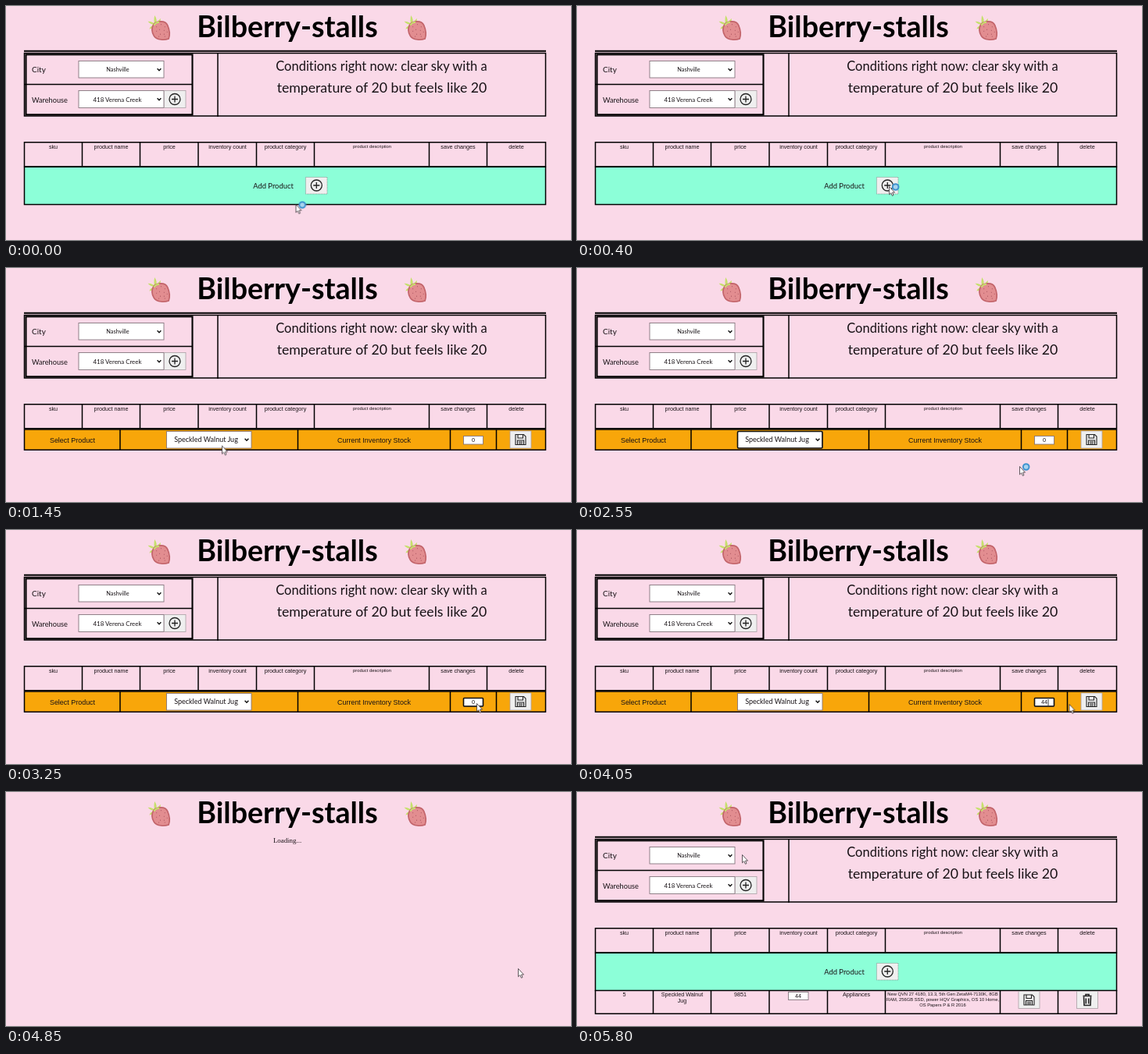
An HTML page for the animation above (5850 ms loop, 723 by 300 pixels).

```html
<!DOCTYPE html>
<html lang="en">
<head>
<meta charset="utf-8">
<title>Shop inventory</title>
<style>
  html, body { margin: 0; width: 100%; height: 100%; overflow: hidden; background: #fad9e8; }
  svg { display: block; width: 100%; height: 100%; }
  text { text-anchor: middle; font: 7.2px "Liberation Sans", Arial, sans-serif; fill: #181216; }
  .hand text, text.hand { font-family: Lato, "Open Sans", sans-serif; font-variant-ligatures: none; }
  .left { text-anchor: start; }
  text.title { font-size: 37.6px; font-weight: 700; fill: #000; }
  .tiny { font-size: 5.8px; }
  .label { font-size: 8.95px; }
  .grid { fill: none; stroke: #000; stroke-width: 1.5; }
  .thick { stroke-width: 2.1; }
  .field { fill: #fff; stroke: #85767e; stroke-width: .9; }
  .btn { fill: #efefef; stroke: #aaa0a5; stroke-width: .8; }
  .dotted { stroke: #777; stroke-dasharray: 1 1; }
  .icon { fill: none; stroke: #222; stroke-width: 1.3; }
  .ring { fill: none; stroke: #101010; stroke-width: 1.6; }

  /* One loop; 1% is 58.5 ms */
  .show { animation: 5.85s step-end infinite; }
  .page { animation-name: page; }
  .loading { animation-name: loading; }
  .add { animation-name: add; }
  .row { animation-name: row; }
  .form { animation-name: form; }
  .pick { animation-name: pick; }
  .edit { animation-name: edit; }
  .n0 { animation-name: n0; }
  .n4 { animation-name: n4; }
  .n44 { animation-name: n44; }
  .busy { animation-name: busy; }
  @keyframes page { 0% { opacity: 1 } 82.85% { opacity: 0 } 94.82% { opacity: 1 } }
  @keyframes loading { 0% { opacity: 0 } 82.85% { opacity: 1 } 94.82% { opacity: 0 } }
  @keyframes add { 0% { opacity: 1 } 7.65% { opacity: 0 } 94.82% { opacity: 1 } }
  @keyframes row { 0% { opacity: 0 } 94.82% { opacity: 1 } }
  @keyframes form { 0% { opacity: 0 } 7.65% { opacity: 1 } 82.85% { opacity: 0 } }
  @keyframes pick { 0% { opacity: 0 } 25.6% { opacity: 1 } 54.65% { opacity: 0 } }
  @keyframes edit { 0% { opacity: 0 } 54.65% { opacity: 1 } }
  @keyframes n0 { 0% { opacity: 1 } 60.65% { opacity: 0 } }
  @keyframes n4 { 0% { opacity: 0 } 63.2% { opacity: 1 } 65.8% { opacity: 0 } }
  @keyframes n44 { 0% { opacity: 0 } 65.8% { opacity: 1 } }
  @keyframes busy { 0% { opacity: 1 } 20.5% { opacity: 0 } 36.8% { opacity: 1 } 51.2% { opacity: 0 } }

  .cursor { animation: move 5.85s ease-in-out infinite; }
  @keyframes move {
    0%, .85% { transform: translate(370.5px, 254px) }
    6%, 7.7% { transform: translate(399px, 231px) }
    11.1% { transform: translate(388px, 231px) }
    16.24%, 17% { transform: translate(331px, 223px) }
    24.2%, 25.6% { transform: translate(276px, 227.5px) }
    31.6% { transform: translate(272px, 288px) }
    35% { transform: translate(276px, 286px) }
    41% { transform: translate(590px, 262px) }
    43.5%, 44.4% { transform: translate(566px, 254px) }
    47% { transform: translate(576px, 288px) }
    53.8%, 63% { transform: translate(602px, 222px) }
    69.2%, 70% { transform: translate(629.5px, 223px) }
    73.5%, 94.8% { transform: translate(655px, 226px) }
    99.1%, 100% { transform: translate(211px, 80px) }
  }
</style>
</head>
<body>
<svg viewBox="0 0 723 300">
  <defs>
    <g id="berry" transform="scale(.97)">
      <path d="M9 13C8 8 8 4 9 0C12 4 12 8 11 12C13 8 14 6 17 4C17 8 15 11 12 13ZM10 13C6 12 2 11 0 8C5 8 8 10 11 13C8 16 5 18 2 18C3 15 6 13 10 13Z" fill="#c6e06c"/>
      <path d="M7 13C10 7 23 6 26 13C29 20 29 27 27.5 31C22 33 12 33 8 27C5 22 5 17 7 13Z" fill="#e28d90" stroke="#c2646a" stroke-width="1.7"/>
      <path d="M11 15h1m5-3h1m4 3h1m-8 4h1m5 1h1m3 2h1m-15-1h1m4 4h1m4 0h1m-8 3h1m7 0h1" stroke="#b5606a" stroke-width="1.3"/>
      <path d="M8 13C10 10 13 9 15 9" fill="none" stroke="#c6e06c" stroke-width="2"/>
    </g>
    <path id="chevron" d="M-2.4-1.3L0 1.3L2.4-1.3" fill="none" stroke="#111" stroke-width="1.4"/>
    <g id="plus" class="icon">
      <circle r="7"/>
      <path d="M-4 0H4M0-4V4"/>
    </g>
    <g id="save">
      <rect class="btn" x="-13.5" y="-11" width="27" height="22"/>
      <path class="icon" d="M-6.5-6.5H4L6.5-4V6.5H-6.5ZM-3.5-6.5V-2H3V-6.5M-4 6.5V1H4V6.5M-2.5 3H2.5M-2.5 5H2.5" style="stroke-width:1.1"/>
    </g>
    <g id="trash">
      <rect class="btn" x="-13.5" y="-11" width="27" height="22"/>
      <path class="icon" d="M-5.5-5H5.5M-2-5V-7H2V-5M-4.5-4L-4 7H4L4.5-4M-1.7-2V5M1.7-2V5" style="stroke-width:1.6"/>
    </g>
  </defs>

  <use href="#berry" x="181.5" y="12"/>
  <use href="#berry" x="509.5" y="12"/>
  <text class="hand title" x="360" y="40">Bilberry-stalls</text>

  <text class="show loading" x="360" y="65" style="font:8.9px 'Liberation Serif',serif">Loading...</text>

  <g class="show page">
    <path class="grid thick" d="M23 57.7H691"/>
    <path class="grid" d="M23.5 60.5H690.5V141H23.5ZM271 60V142M23 100.5H239"/>
    <rect class="grid thick" x="25.5" y="62.3" width="213" height="77"/>
    <g class="hand">
      <text class="left" x="33" y="85" style="font-size:10px">City</text>
      <text class="left" x="33" y="123.5" style="font-size:9.2px">Warehouse</text>
      <rect class="field" x="93" y="70.5" width="109" height="21.5"/>
      <rect class="field" x="93" y="108.5" width="109" height="22"/>
      <text x="143" y="84" style="font-size:7.4px">Nashville</text>
      <text x="142.5" y="122.5" style="font-size:7.9px">418 Verena Creek</text>
      <text x="480.5" y="82.5" style="font-size:16.5px">Conditions right now: clear sky with a</text>
      <text x="481" y="111" style="font-size:17.7px">temperature of 20 but feels like 20</text>
    </g>
    <use href="#chevron" x="196" y="81.5"/>
    <use href="#chevron" x="196" y="119.5"/>
    <rect class="btn" x="202.5" y="108.5" width="27.5" height="22"/>
    <use href="#plus" x="216" y="119.5"/>

    <path class="grid" d="M23.5 174.8H690.5V205.8H23.5ZM97.5 175V206M171.5 175V206M246 175V206M320.5 175V206M394.5 175V206M541.5 175V206M615.5 175V206"/>
    <text x="60.5" y="182.5">sku</text>
    <text x="134.5" y="182.5">product name</text>
    <text x="209" y="182.5">price</text>
    <text x="283.5" y="182.5">inventory count</text>
    <text x="357.5" y="182.5">product category</text>
    <text class="tiny" x="468.5" y="181.5">product description</text>
    <text x="578.5" y="182.5">save changes</text>
    <text x="653" y="182.5">delete</text>

    <g class="show add">
      <rect class="grid" x="23.5" y="206.3" width="667" height="48.2" style="fill:#8cffd8"/>
      <text class="hand" x="342" y="234" style="font-size:9.4px">Add Product</text>
      <rect class="btn dotted" x="383.5" y="219.5" width="27.5" height="21.5"/>
      <use href="#plus" x="397.3" y="230"/>
    </g>

    <g class="show row">
      <path class="grid" d="M23.5 254V284.3H690.5V254M97.5 254V284M171.5 254V284M246 254V284M320.5 254V284M394.5 254V284M541.5 254V284M615.5 254V284"/>
      <text x="60.5" y="262">5</text>
      <text x="134.5" y="262">Speckled Walnut</text>
      <text x="134.5" y="270">Jug</text>
      <text x="209" y="262">9851</text>
      <rect class="field" x="270.5" y="256.5" width="25.5" height="10"/>
      <text x="283" y="264">44</text>
      <text x="357.5" y="262">Appliances</text>
      <text class="tiny" x="468" y="261">New QVN 27 4180, 13.3, 5th Gen ZetaM4-7130K, 8GB</text>
      <text class="tiny" x="468" y="268">RAM, 256GB SSD, power HQV Graphics, OS 10 Home,</text>
      <text class="tiny" x="468" y="274.5">OS Papers P &amp; R 2016</text>
      <use href="#save" x="578.5" y="266.5"/>
      <use href="#trash" x="653" y="266.5"/>
    </g>

    <g class="show form">
      <rect class="grid" x="23.5" y="207" width="667" height="26.2" style="fill:#f8a60a"/>
      <path class="grid" d="M146 207V233M373.5 207V233M568.5 207V233M627.5 207V233"/>
      <text class="label" x="85" y="223.5">Select Product</text>
      <rect class="field" x="205.5" y="209.5" width="108.5" height="21.5"/>
      <rect class="ring show pick" x="205.5" y="209.5" width="108.5" height="21.5" rx="1.5"/>
      <text class="hand" x="256" y="223" style="font-size:9px">Speckled Walnut Jug</text>
      <use href="#chevron" x="308" y="220"/>
      <text class="label" x="471" y="223.5">Current Inventory Stock</text>
      <rect class="field" x="585.5" y="215.5" width="25" height="10.5"/>
      <rect class="ring show edit" x="585.5" y="215.5" width="25" height="10.5" rx="1"/>
      <text class="show n0" x="598" y="223.3">0</text>
      <text class="show n4" x="598" y="223.3">4</text>
      <g class="show n44">
        <text x="598" y="223.3">44</text>
        <path d="M603 217V225" stroke="#111" stroke-width=".8"/>
      </g>
      <use href="#save" x="658.5" y="220"/>
    </g>
  </g>

  <g class="cursor">
    <path d="M.5 .5V10.8L2.8 8.7L4.4 12.3L6 11.6L4.5 8.1H7.5Z" fill="#fff" stroke="#3c3439" stroke-width=".8"/>
    <g class="show busy">
      <circle cx="8.7" cy="1" r="3.8" fill="#a9d3ee" stroke="#3f93cf" stroke-width="2"/>
    </g>
  </g>
</svg>
</body>
</html>
```
